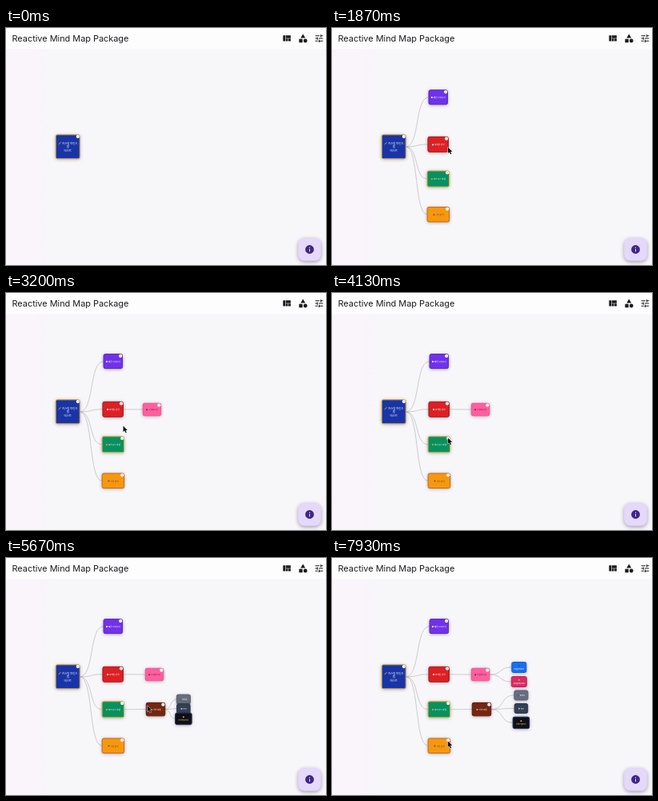
Write an HTML page with a canvas that moves like this. It is 400x297 px and loops after 8 s.

```html
<!DOCTYPE html>
<html lang="en">
<head>
<meta charset="utf-8">
<title>Reactive Mind Map Package</title>
<style>
  html, body { margin: 0; width: 100%; height: 100%; overflow: hidden; background: #f8f6fa; }
  canvas { display: block; width: 400px; height: 297px; }
</style>
</head>
<body>
<canvas id="stage"></canvas>
<script>
const LOOP = 8000, OPEN_TIME = 600;
const canvas = document.getElementById('stage');
const ctx = canvas.getContext('2d');
const ratio = window.devicePixelRatio || 1;
canvas.width = 400 * ratio;
canvas.height = 297 * ratio;

// x, y: settled centre. opens: when the children slide out.
const nodes = {
  root: { x: 77.2, y: 148.8, w: 30, h: 30, fill: '#1834a6', border: '#d9a63a', opens: 1430,
    size: 3.4, lines: ['커스텀 마인드', '맵', '테스트'], icon: '#f59a2a' },
  idea: { parent: 'root', x: 133.8, y: 85.6, w: 23.5, h: 18, fill: '#7031ea', border: '#5d25c4',
    lines: ['빠른 아이디어'], icon: '#fff', knob: true },
  marketing: { parent: 'root', x: 133.7, y: 145.8, w: 25.5, h: 19, fill: '#dc2024', border: '#a9181c', opens: 2835,
    lines: ['마케팅 전략'], icon: '#fff' },
  business: { parent: 'root', x: 133.8, y: 189.8, w: 27.5, h: 20, fill: '#09905f', border: '#d9b53c', opens: 4250,
    lines: ['비즈니스 모델'], icon: '#f5a030' },
  market: { parent: 'root', x: 133.9, y: 235.3, w: 27.5, h: 18.5, fill: '#f6980f', border: '#c8661a',
    lines: ['시장 분석'], icon: '#8a4a12', ink: '#74400e', knob: true },
  social: { parent: 'marketing', x: 185.5, y: 146, w: 22.5, h: 15.5, fill: '#ff5f9e', border: '#f0568f', opens: 6900,
    lines: ['소셜미디어'], icon: '#8c1440', ink: '#7d1842' },
  pricing: { parent: 'business', x: 187, y: 189.6, w: 23.5, h: 16.5, fill: '#752510', border: '#5c1c0c', opens: 5470,
    lines: ['가격 모델'], icon: '#f0b090' },
  basic: { parent: 'pricing', x: 236.4, y: 172, w: 17, h: 12, fill: '#666d7d', border: '#5a6070',
    lines: ['Basic'], icon: '#596070' },
  pro: { parent: 'pricing', x: 236.4, y: 188.5, w: 16.5, h: 12, fill: '#333f55', border: '#2a354a',
    lines: ['Pro'], icon: '#b9c4d6' },
  enterprise: { parent: 'pricing', x: 236.4, y: 206.4, w: 20.5, h: 14.5, fill: '#0d1019', border: '#252b52',
    lines: ['Enterprise'], icon: '#fbc02d', ink: '#f5c542', iconAbove: true },
  pages: { parent: 'social', x: 233.8, y: 137, w: 18, h: 13, fill: '#1a6dec', border: '#1660d4',
    lines: ['Pagemoor'], icon: '#1557c4', iconAbove: true },
  photos: { parent: 'social', x: 233.8, y: 155, w: 19, h: 13, fill: '#da2b63', border: '#c2255a',
    lines: ['Snaplooma'], icon: '#ff9ab8', iconAbove: true }
};

// Pointer stops: time, x, y
const pointerPath = [
  [600, 112, 162], [1150, 89.5, 137], [1450, 89.5, 137], [1870, 145, 149.5],
  [2250, 144.5, 140], [2880, 144.5, 140], [3200, 146.5, 166.5], [3650, 144.8, 181.5],
  [4300, 144.8, 181.5], [5000, 196, 184], [5450, 196, 184], [5670, 177, 185],
  [6400, 194, 143.5], [6950, 194, 143.5], [7550, 144.8, 229.5], [8000, 144.8, 229.5]
];

const icons = {
  quilt: new Path2D('M10 18h5v-6h-5zM4 18h5V5H4zM16 18h5v-6h-5zM10 5v6h11V5z'),
  shapes: new Path2D('M12 2L6.5 11h11zM3 13.5h8v8H3zM22 17.5a4.5 4.5 0 1 1-9 0a4.5 4.5 0 1 1 9 0z'),
  tune: new Path2D('M3 17v2h6v-2zM3 5v2h10V5zm10 16v-2h8v-2h-8v-2h-2v6zM7 9v2H3v2h4v2h2V9zm14 4v-2H11v2zm-6-4h2V7h4V5h-4V3h-2z'),
  info: new Path2D('M12 2a10 10 0 1 0 0 20a10 10 0 1 0 0-20zm1 15h-2v-6h2zm0-8h-2V7h2z')
};
const arrow = new Path2D('M0 0V7.6L1.8 6L3 8.8L4.3 8.2L3.1 5.5H5.4z');

const clamp = v => Math.min(1, Math.max(0, v));
const easeOut = p => 1 - (1 - p) ** 3;
const smooth = p => p * p * (3 - 2 * p);

function withShadow(color, blur, dy, draw) {
  ctx.save();
  ctx.shadowColor = color;
  ctx.shadowBlur = blur * ratio;
  ctx.shadowOffsetY = dy * ratio;
  draw();
  ctx.restore();
}

function box(x, y, w, h, r) {
  ctx.beginPath();
  ctx.roundRect(x, y, w, h, r);
}

function dot(x, y, r, color) {
  ctx.fillStyle = color;
  ctx.beginPath();
  ctx.arc(x, y, r, 0, 7);
  ctx.fill();
}

function icon(path, cx, cy, size, color) {
  ctx.save();
  ctx.translate(cx - size / 2, cy - size / 2);
  ctx.scale(size / 24, size / 24);
  ctx.fillStyle = color;
  ctx.fill(path);
  ctx.restore();
}

// Small labels are set at ten times their size and scaled down.
function label(text, x, y, size, color) {
  ctx.save();
  ctx.translate(x, y);
  ctx.scale(.1, .1);
  ctx.font = `500 ${size * 10}px "Noto Sans CJK KR", "Noto Sans CJK", sans-serif`;
  ctx.textAlign = 'center';
  ctx.textBaseline = 'middle';
  ctx.fillStyle = color;
  ctx.fillText(text, 0, 0);
  const width = ctx.measureText(text).width / 10;
  ctx.restore();
  return width;
}

function position(node, t) {
  const parent = nodes[node.parent];
  if (!parent) return node;
  const p = easeOut(clamp((t - parent.opens) / OPEN_TIME));
  return { x: parent.x + (node.x - parent.x) * p, y: parent.y + (node.y - parent.y) * p };
}

function drawEdge(node, t) {
  const parent = nodes[node.parent];
  const from = position(parent, t), to = position(node, t);
  const x1 = from.x + parent.w / 2, x2 = to.x - node.w / 2;
  const bend = (x2 - x1) * .62;
  ctx.beginPath();
  ctx.moveTo(x1, from.y);
  ctx.bezierCurveTo(x1 + bend, from.y, x2 - bend, to.y, x2, to.y);
  ctx.strokeStyle = '#b9b8bc';
  ctx.lineWidth = .7;
  ctx.stroke();
}

function drawNode(node, t) {
  const { x, y } = position(node, t);
  const { w, h, lines, size = 2.6, ink = '#fff' } = node;
  const left = x - w / 2, top = y - h / 2;
  withShadow('rgba(40,30,50,.4)', 4, .8, () => {
    box(left, top, w, h, 2);
    ctx.fillStyle = node.fill;
    ctx.fill();
  });
  ctx.strokeStyle = node.border;
  ctx.lineWidth = 1;
  ctx.stroke();

  const isRoot = !node.parent;
  const shift = isRoot ? 2.6 : node.iconAbove ? 0 : 1.6;
  const firstY = isRoot ? y - 4.4 : y + (node.iconAbove ? 1.6 : .3);
  lines.forEach((text, i) => {
    const width = label(text, x + (i ? 0 : shift), firstY + i * 4.5, size, ink);
    if (i) return;
    if (isRoot) {
      ctx.strokeStyle = node.icon;
      ctx.beginPath();
      ctx.moveTo(x - 11.5, firstY + 1.5);
      ctx.lineTo(x - 8.6, firstY - 1.2);
      ctx.stroke();
    } else if (node.iconAbove) {
      dot(x, y - 2.2, .9, node.icon);
    } else {
      dot(x + shift - width / 2 - 2, firstY, 1, node.icon);
    }
  });

  if (node.opens || node.knob) {
    const kx = x + w / 2 - 2.4, ky = top + 2.3;
    dot(kx, ky, 2.1, '#fff');
    dot(kx, ky, .6, '#b5b0b8');
  }
}

function drawPointer(t) {
  const next = pointerPath.findIndex(stop => stop[0] > t);
  if (next < 1) return;
  const [t0, x0, y0] = pointerPath[next - 1], [t1, x1, y1] = pointerPath[next];
  const p = smooth((t - t0) / (t1 - t0));
  ctx.save();
  ctx.translate(x0 + (x1 - x0) * p, y0 + (y1 - y0) * p);
  ctx.lineJoin = 'round';
  ctx.lineWidth = 1;
  ctx.strokeStyle = 'rgba(255,255,255,.85)';
  ctx.stroke(arrow);
  ctx.fillStyle = '#111';
  ctx.fill(arrow);
  ctx.restore();
}

function drawPage() {
  const tint = ctx.createLinearGradient(0, 0, 56, 0);
  tint.addColorStop(0, '#faf5fb');
  tint.addColorStop(.7, '#f9f5fb');
  tint.addColorStop(1, '#f7f6f9');
  ctx.fillStyle = tint;
  ctx.fillRect(0, 0, 400, 297);
  ctx.fillStyle = '#fefdfe';
  ctx.fillRect(0, 0, 400, 26.5);

  ctx.font = '10.9px Inter, Roboto, sans-serif';
  ctx.fillStyle = '#1d1b20';
  ctx.fillText('Reactive Mind Map Package', 7.5, 16.8);
  icon(icons.quilt, 350.8, 13.2, 13.5, '#1d1b20');
  icon(icons.shapes, 371.2, 13, 13, '#1d1b20');
  icon(icons.tune, 391.4, 13, 13, '#1d1b20');
}

function drawInfoButton() {
  withShadow('rgba(50,35,70,.45)', 5, 1.5, () => {
    box(365.2, 263.2, 28.6, 28.6, 8);
    ctx.fillStyle = '#e4d9fa';
    ctx.fill();
  });
  icon(icons.info, 379.5, 277.5, 13, '#3f2585');
}

function render(t) {
  ctx.setTransform(ratio, 0, 0, ratio, 0, 0);
  drawPage();
  const visible = Object.values(nodes).filter(n => !n.parent || t >= nodes[n.parent].opens);
  visible.filter(n => n.parent).forEach(n => drawEdge(n, t));
  visible.forEach(n => drawNode(n, t));
  drawInfoButton();
  drawPointer(t);
}

const start = performance.now();
function tick() {
  render((performance.now() - start) % LOOP);
  requestAnimationFrame(tick);
}
tick();
</script>
</body>
</html>
```
